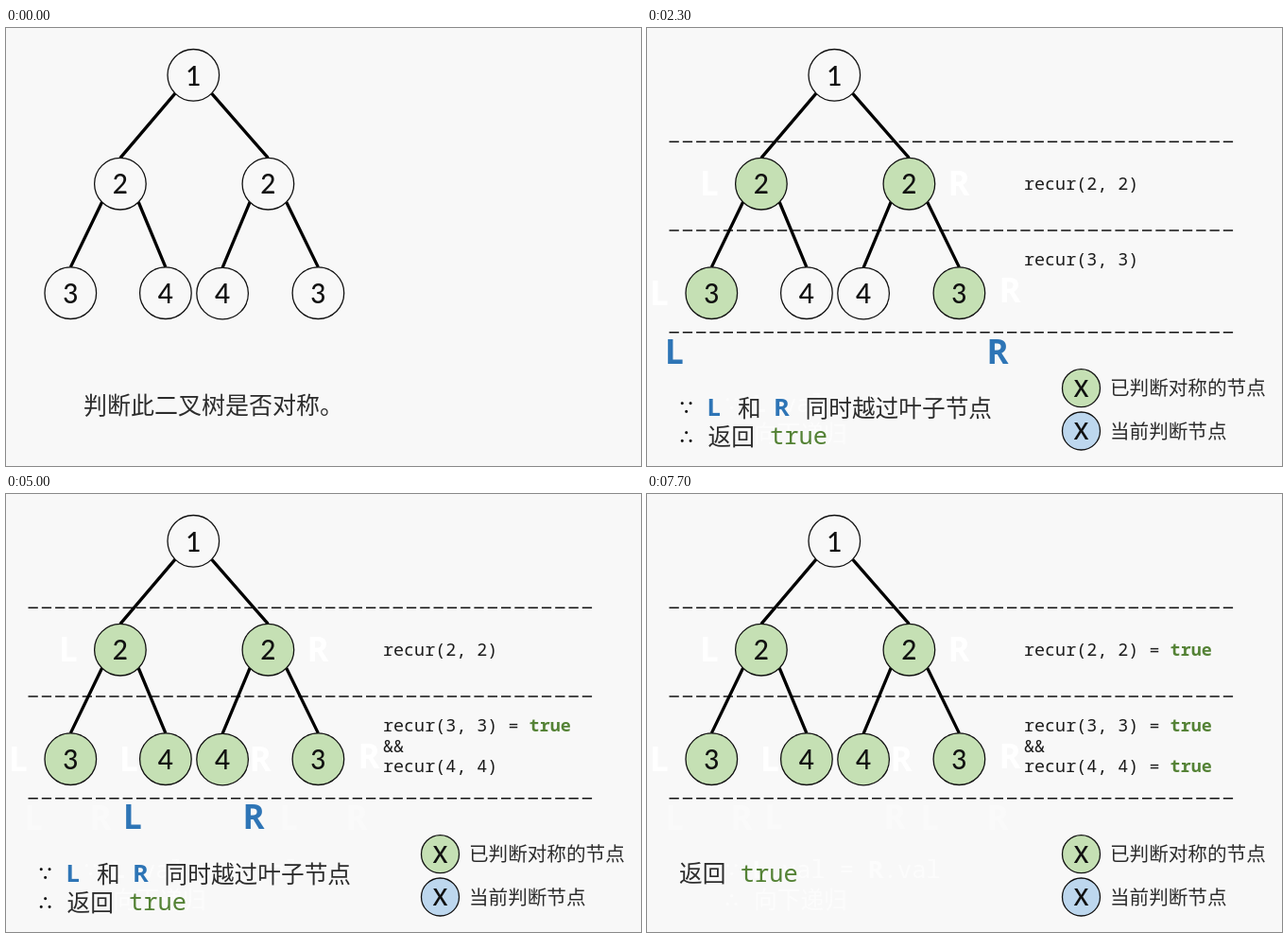
These frames come from a looping animation (672 by 463 pixels, 8000 ms). An HTML page:

```html
<!DOCTYPE html>
<html lang="zh-CN">
<head>
<meta charset="utf-8">
<title>对称二叉树</title>
<style>
  html, body { margin: 0; width: 100%; height: 100%; overflow: hidden; background: #f8f8f8; }
  svg { display: block; }
  text { white-space: pre; }
  .mono { font-family: "Noto Sans Mono", "DejaVu Sans Mono", monospace; }
  .cjk { font-family: "Noto Sans CJK SC", "Noto Sans CJK", sans-serif; font-weight: 300; }
  .digit { font: 500 28px Lato, sans-serif; text-anchor: middle; }
  .key { font: 600 25px "Open Sans", sans-serif; text-anchor: middle; }
  .medium { font-weight: 500; }
  .bold { font-weight: 800; }
  .pointer { font-family: "Noto Sans", sans-serif; font-weight: 800; }
  .label { text-anchor: middle; }
  .ghost, .ghost text { fill: #fff; }
</style>
</head>
<body>
<svg id="stage" width="672" height="463" viewBox="0 0 672 463"></svg>
<script>
const stage = document.getElementById('stage');
const BG = '#f8f8f8', BLUE = '#bdd7ee', GREEN = '#c5e0b4', INK = '#2e75b6', TRUE = '#548235';

// x, y, digit, step at which the node is being compared
const nodes = [
  [198.3, 49.8, 1, 99], [120.9, 164.7, 2, 1], [277.4, 164.7, 2, 1],
  [68.3, 280.2, 3, 2], [168.9, 280.2, 4, 5], [229.1, 280.6, 4, 5], [330.4, 280.2, 3, 2]
];
const RADIUS = 27.3;

// Pointer positions per step: L x, L y, R x, R y
const pointers = {
  1: [67, 177, 330, 177], 2: [14, 293, 384, 290], 3: [30, 355, 371, 355],
  4: [300, 355, 100, 355], 5: [131, 293, 269, 293], 6: [135, 354, 262, 354],
  7: [213, 355, 187, 355]
};

const text = (x, y, str, size, cls, fill = '#111') =>
  `<text x="${x}" y="${y}" font-size="${size}" class="${cls}" fill="${fill}">${str}</text>`;
const mono = (x, y, str, fill) => text(x, y, str, 25.4, 'mono medium', fill);
const bold = (x, y, str) => text(x - 1, y, str, 25.4, 'pointer', INK);
const cjk = (x, y, str, size = 24.7) => text(x, y, str, size, 'cjk', '#2c2c2c');
const code = (y, str) => text(399, y, str, 18.4, 'mono', '#1c1c1c');
const circle = (x, y, r, fill) =>
  `<circle cx="${x}" cy="${y}" r="${r}" fill="${fill}" stroke="#111" stroke-width="1.3"/>`;
const dashes = y =>
  `<path d="M23.5 ${y}H621" stroke="#111" stroke-width="1.5" stroke-dasharray="10.3 4"/>`;

// Each edge leaves its parent at 45 degrees and meets the top of the child
const edges = nodes.slice(1).map(([x, y], i) => {
  const [px, py] = nodes[i >> 1], d = RADIUS * Math.SQRT1_2;
  return `M${px + (i % 2 ? d : -d)} ${py + d}L${x} ${y - RADIUS}`;
}).join('');

function pointerPair(step, cls = '', alpha = 1) {
  const [lx, ly, rx, ry] = pointers[step];
  return `<g opacity="${alpha}">` + text(lx - 1, ly, 'L', 35, 'pointer label ' + cls, INK) +
    text(rx, ry, 'R', 35, 'pointer label ' + cls, INK) + '</g>';
}

function call(y, n, done) {
  return code(y, `recur(${n}, ${n})${done ? ' = ' : ''}`) +
    (done ? text(553.6, y, 'true', 18.4, 'mono bold', TRUE) : '');
}

const compareNote = () => mono(82, 406, '∵') + bold(112.5, 406, 'L') + mono(127.7, 406, '.val = ') +
  bold(234.5, 406, 'R') + mono(249.7, 406, '.val') + mono(82, 438, '∴') + cjk(113, 438, '向下递归');

const leafNote = () => mono(34, 410, '∵') + bold(64.5, 410, 'L') + cjk(96, 411, '和') +
  bold(135, 410, 'R') + cjk(167.5, 411, '同时越过叶子节点') +
  mono(34, 441, '∴') + cjk(64.5, 441, '返回') + mono(130, 440, 'true', TRUE);

function note(step) {
  if (step === 0) return cjk(82, 408, '判断此二叉树是否对称。', 25);
  if ([1, 2, 5].includes(step)) return compareNote();
  if (step < 8) return leafNote();
  return step === 8
    ? cjk(34.5, 411, '回溯返回') + mono(149, 410, 'true', TRUE)
    : cjk(34, 410, '返回') + mono(98.7, 410, 'true', TRUE);
}

const legend = (y, fill, str) => circle(459.5, y, 20, fill) +
  text(459.5, y + 9, 'X', 25, 'key') + cjk(490, y + 7.5, str, 20.6);

// Earlier pointers and notes leave pale traces behind
function traces(step) {
  let out = '';
  for (let s = 1; s < Math.min(step, 7); s++)
    out += pointerPair(s, 'ghost', pointers[s][1] > 340 ? 0.3 : 1);
  if (step > 2 && step !== 5) out += `<g class="ghost" opacity=".6">${compareNote()}</g>`;
  return out;
}

function scene(step) {
  let out = traces(step);
  if (step >= 1) out += dashes(120.3) + dashes(214) + call(171, 2, step > 8) +
    legend(426, BLUE, '当前判断节点');
  if (step >= 2) out += dashes(321.8) + call(251, 3, step > 4) +
    legend(380.7, GREEN, '已判断对称的节点');
  if (step >= 5) out += code(273, '&amp;&amp;') + call(294, 4, step > 7);
  out += `<path d="${edges}" stroke="#000" stroke-width="3.3"/>`;
  for (const [x, y, digit, active] of nodes) {
    const fill = step < active ? BG : step === active ? BLUE : GREEN;
    out += circle(x, y, RADIUS, fill) + text(x, y + 10.7, digit, 28, 'digit');
  }
  if (pointers[step]) out += pointerPair(step);
  return out + note(step);
}

let shown = -1;
function tick(now) {
  const t = now % 8000;
  const step = t < 500 ? 0 : 1 + Math.floor((t - 500) / 900);
  if (step !== shown) stage.innerHTML = scene(shown = step);
  requestAnimationFrame(tick);
}
tick(0);
</script>
</body>
</html>
```
